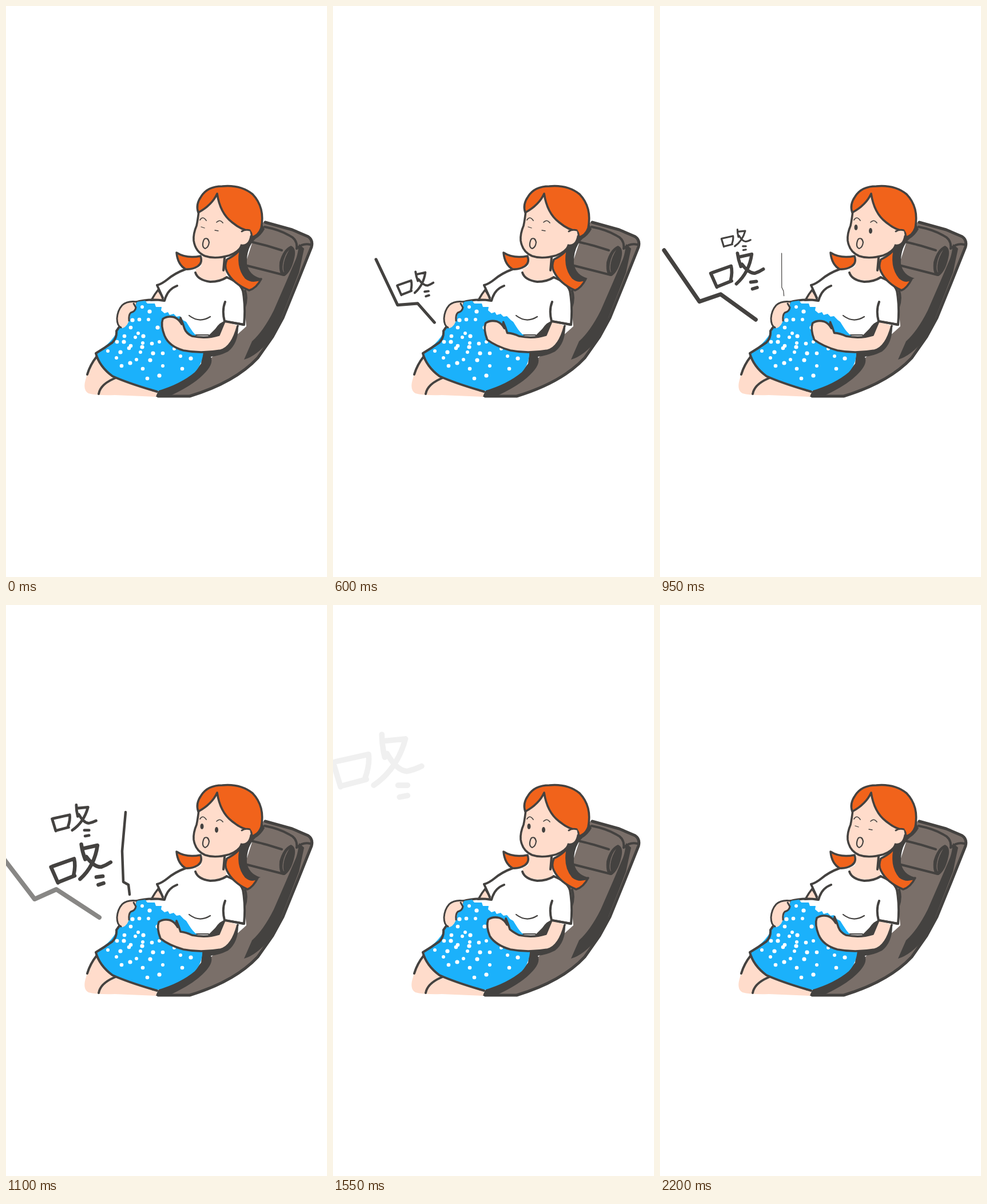
Recreate the animation shown at these times as an HTML page. Size 561x998 px, loop 2.25 s.

```html
<!DOCTYPE html>
<html lang="zh">
<head>
<meta charset="utf-8">
<style>
html, body { margin: 0; width: 100%; height: 100%; overflow: hidden; background: #fff; }
svg { display: block; width: 100vw; height: 100vh; }
svg * { stroke-linecap: round; stroke-linejoin: round; }
.line { fill: none; stroke: #444240; stroke-width: 4; }
.thin { stroke-width: 2.2; }
.dark { fill: #444240; }
.grey { fill: #7a6f69; }
.skin { fill: #ffdccb; }
.hair { fill: #f1631b; }
.blue { fill: #1bb1fb; }
.white { fill: #fff; }
.ink { stroke: #444240; stroke-width: 3.6; }
</style>
</head>
<body>
<svg viewBox="0 0 561 998">
  <defs>
    <!-- hand-lettered thump, centred on the origin -->
    <path id="thump" d="M-60-5L-50 28M-57-6L-12-16Q-10-2-17 17M-49 27L-15 18M6-43Q6-28 10-12M8-34L38-37Q27 4-5 26M13-17Q26 6 40 7Q50 5 60 0M28 26L41 26M30 42L41 40"/>
  </defs>

  <g class="line">
    <path id="bolt1"/><use id="word1" href="#thump"/>
    <path id="bolt2"/><use id="word2" href="#thump"/>
  </g>

  <g id="chair">
    <path class="grey" d="M452 377L500 391L528 403Q538 410 534 421L508 486L484 545L466 578L440 615Q400 655 320 683H262L342 630L420 560L412 470L440 384Z"/>
    <path class="dark" d="M512 416Q510 436 505 446L488 486L468 532Q450 568 430 586L416 618Q438 612 463 582L480 548L497 505L512 466L521 424Z"/>
    <path class="line" style="stroke-width:5" d="M453 378L500 391L528 403Q537 409 534 421L508 486L484 545L466 578L440 615Q400 658 321 682L266 682"/>
    <path class="line" d="M508 424Q518 414 532 417M452 386Q478 391 495 401Q510 408 508 424"/>
    <path class="line" d="M428 412Q455 418 482 427M422 454L485 470"/>
    <path class="dark" d="M498 419Q508 423 504 440Q499 464 487 472Q476 472 478 448Q484 425 498 419Z"/>
    <path class="grey" d="M495 426Q487 434 484 450Q482 462 486 466Q481 450 495 426Z"/>
    <path class="dark" d="M448 382L452 390Q446 401 436 407Q420 422 421 450Q424 470 445 476L424 482Q400 465 404 440Q408 420 430 400Z"/>
    <path class="dark" d="M406 560Q406 590 388 604Q372 612 358 613Q364 626 344 645Q325 664 283 683H261L268 670Q320 655 341 625L343 604Q382 600 400 560Z"/>
    <path class="line" d="M418 498Q422 512 417 526"/>
  </g>

  <path class="skin" d="M160 610Q143 630 140 650Q133 671 144 677Q158 681 190 680L262 683L265 674Q220 662 170 634Z"/>
  <path class="line" d="M159 612Q147 627 142 644M194 649Q165 660 162 678"/>
  <path class="skin ink" d="M266 496Q258 506 254 515L275 514L272 506Z"/>

  <path class="white" d="M314 460Q292 468 264 487L274 510L277 514L230 518L300 560L330 577H360L382 551L415 557Q419 520 414 498Q409 483 385 474L333 466Z"/>
  <path class="line" d="M314 460Q295 467 282 478Q272 486 264 488L274 510M299 489Q283 495 278 512L277 515M385 474Q409 483 414 498Q419 525 416 557L382 551M383 517Q377 532 382 551M226 518Q250 511 276 515"/>
  <path class="line thin" d="M320 541Q338 555 357 543M327 575L354 575" stroke-linecap="round"/>

  <path id="skirt" class="blue"/>
  <path class="line" d="M226 520Q212 535 200 558L193 568Q194 580 186 588Q172 598 157 607Q163 630 186 647Q215 660 264 674"/>
  <g id="dots" class="white"></g>
  <path class="skin" d="M228 517Q212 515 203 523Q194 536 194 548Q195 562 204 563Q213 560 216 546L218 536Q226 533 226 526Z"/>
  <path class="line thin" style="stroke-width:3" d="M228 517Q212 515 203 523Q195 532 194 546Q194 559 201 562M215 550Q214 540 218 536Q226 534 227 527L223 520"/>

  <path class="dark" d="M384 550Q374 552 366 564L352 578L375 577Z"/>
  <path id="arm" class="skin ink"/>
  <path class="line" d="M416 557L382 551"/>

  <path class="skin" d="M343 434L341 455L331 460L333 471Q357 487 385 474L384 438Z"/>
  <path class="line" d="M331 466Q335 479 357 482Q374 482 386 474M382 440L380 462"/>
  <g class="hair ink">
    <path id="lock"/>
    <path d="M298 431Q315 442 340 437Q344 449 335 455Q325 461 314 460Q300 452 298 431Z"/>
  </g>
  <path class="skin ink" d="M337 358Q335 375 333 384Q327 398 328 410Q331 430 348 437Q365 443 390 436Q407 430 412 418Q426 420 429 402L420 380L370 325Z"/>
  <path class="hair ink" d="M369 328Q374 362 395 378Q412 392 426 393Q430 398 429 404Q441 402 446 388Q453 352 431 329Q410 312 378 315Q352 315 341 333Q331 347 336 361Q360 348 369 328Z"/>
  <path class="skin" d="M426 392Q412 390 410 400L409 416L416 418Q426 416 428 402Z"/>
  <path class="line" style="stroke-width:3" d="M426 392Q418 390 412 394M411 418Q425 420 428 402"/>
  <path class="line thin" style="stroke-width:1.7" d="M339 374Q344 366 350 375M368 378Q374 372 379 379"/>
  <path class="line thin" d="M347 407Q353 404 355 413Q354 422 348 424Q343 422 344 415Q345 409 347 407Z"/>
  <path id="shut" class="line" style="stroke-width:1.3" d="M341 386L347 388M365 392L371 393"/>
  <g id="open" class="dark"><ellipse cx="342.5" cy="387" rx="3" ry="5"/><ellipse cx="368" cy="393" rx="3" ry="5"/></g>
</svg>
<script>
const LOOP = 2250, STEP = 50;
const $ = id => document.getElementById(id);
const mix = (a, b, p) => a + (b - a) * p;

const spots = [238,526, 251,534, 233,548, 249,548, 221,549, 218,562, 231,572, 265,562, 207,577,
  226,579, 240,577, 194,587, 178,603, 206,587, 218,594, 239,589, 238,596, 255,590, 268,587,
  200,605, 215,598, 193,615, 217,624, 202,629, 235,605, 257,607, 274,607, 228,618, 252,619,
  239,634, 274,629, 268,646, 247,651, 305,612, 323,616, 308,634, 294,599];
for (let i = 0; i < spots.length; i += 2)
  $('dots').innerHTML += `<circle cx="${spots[i]}" cy="${spots[i + 1]}" r="${3 + i % 3 * .3}"/>`;

// Smooth value through [time, value] pairs
function ease(t, keys) {
  for (let i = 1; i < keys.length; i++) {
    const [t0, a] = keys[i - 1], [t1, b] = keys[i];
    if (t <= t1) {
      const p = Math.max(0, (t - t0) / (t1 - t0));
      return mix(a, b, p * p * (3 - 2 * p));
    }
  }
  return keys[keys.length - 1][1];
}
const fade = (t, from, to) => Math.max(0, Math.min(1, (to - t) / (to - from)));

// Each thump grows steadily through the poses at times t0 and t1; word = [x, y, scale]
const thumps = [
  { start: 600, t0: 750, t1: 1100, tilt: -7, width: [6, 8],
    lineFade: [950, 1360], wordFade: [1100, 1340],
    a: [46,436, 94,520, 130,513, 173,551], b: [-22,420, 50,514, 88,497, 163,546],
    word: [[140, 478, .63], [131, 456, .87]] },
  { start: 950, t0: 1100, t1: 1350, tilt: 0, width: [4.5, 10],
    lineFade: [1130, 1450], wordFade: [1190, 1580],
    a: [209,362, 203,430, 205,484, 214,489, 216,506], b: [203,245, 187,400, 192,471, 211,474, 215,505],
    word: [[119, 377, .64], [96, 324, 1]] }
];

function drawThump(k, n, t) {
  const bolt = $('bolt' + n), word = $('word' + n);
  const p = (t - k.t0) / (k.t1 - k.t0), shown = t >= k.start;
  const [x, y, s] = k.word[0].map((v, i) => mix(v, k.word[1][i], p));
  bolt.setAttribute('d', 'M' + k.a.map((v, i) => mix(v, k.b[i], p)).join(' '));
  bolt.style.strokeWidth = mix(...k.width, p);
  bolt.style.opacity = shown ? fade(t, ...k.lineFade) : 0;
  word.setAttribute('transform', `translate(${x} ${y}) rotate(${k.tilt}) scale(${Math.max(.1, s)})`);
  word.style.strokeWidth = 7.5;
  word.style.opacity = shown ? fade(t, ...k.wordFade) : 0;
}

function draw(t) {
  const h = ease(t, [[0, 0], [350, -6], [750, -8], [1100, -7], [1350, -6], [1800, 1.5], [2250, 0]]);
  const sway = ease(t, [[0, 0], [350, 0], [750, -6], [1100, -6], [1350, 0], [2250, 0]]);
  const at = (x, y) => `${x + h} ${y - h}`;
  $('arm').setAttribute('d', `M382 551L372 575Q350 582 325 577Q315 572 ${at(312, 564)}Q${at(309, 554)} ${at(305, 545)
    }Q${at(304, 551)} ${at(307, 556)}Q${at(302, 547)} ${at(294, 544)}Q${at(282, 541)} ${at(274, 547)
    }Q${at(270, 558)} ${at(277, 576)}Q285 595 310 602Q340 608 375 602Q395 597 405 559`);
  const q = h / 4;
  $('skirt').setAttribute('d', `M228 517Q212 535 198 560Q190 585 158 606Q165 635 190 649Q220 662 264 673Q305 661 330 640Q344 625 ${
    345 + q} 602L${333 - q} 577Q326 570 320 560L315 552L${309 - q} 549L304 542L298 543L293 538L286 540L283 535L277 537L271 532L272 526L262 526L260 520L247 520L243 515Z`);
  $('lock').setAttribute('d', `M411 420Q408 432 386 443Q381 455 386 464Q396 485 ${425 + sway / 2} 497Q${
    438 + sway} 493 ${446 + sway} 477Q430 484 419 475Q402 455 411 420Z`);
  const awake = t >= 900 && t < 2000;
  $('open').style.display = awake ? '' : 'none';
  $('shut').style.display = awake ? 'none' : '';
  thumps.forEach((k, i) => drawThump(k, i + 1, t));
}

const begin = performance.now();
function tick() {
  const t = (performance.now() - begin) % LOOP;
  draw(Math.floor(t / STEP) * STEP);
  requestAnimationFrame(tick);
}
tick();
</script>
</body>
</html>
```
